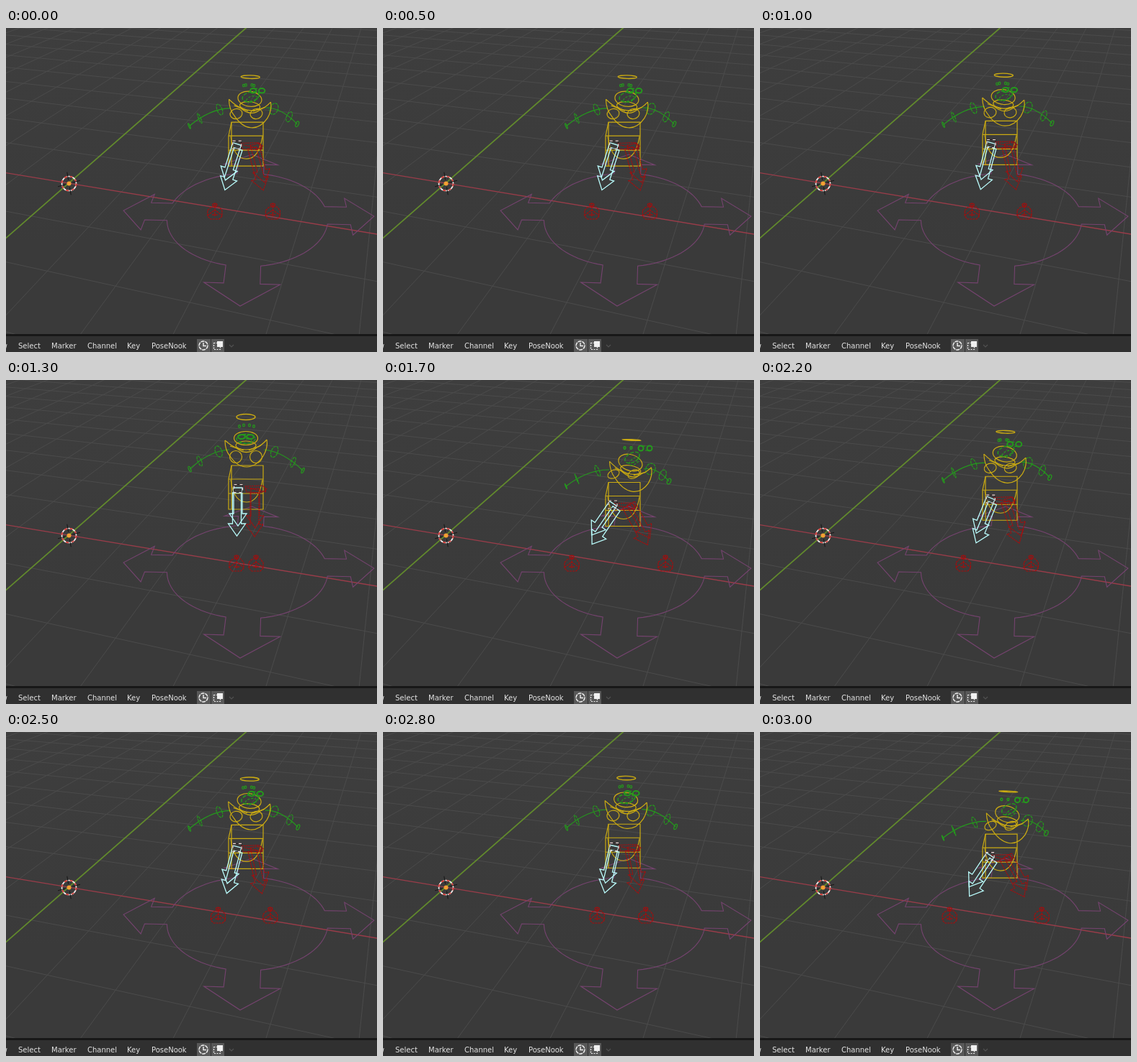
Recreate the animation shown at these times as an HTML page with a canvas. Size 515 px wide and 451 px high, loop 3800 ms.

```html
<!DOCTYPE html>
<html lang="en">
<head>
<meta charset="utf-8">
<title>Rig pose slider</title>
<style>
html, body { margin: 0; width: 100%; height: 100%; overflow: hidden; background: #3a3a3a; }
canvas { display: block; }
</style>
</head>
<body>
<canvas id="stage" width="515" height="451"></canvas>
<script>
const c = document.getElementById('stage').getContext('2d');
const YELLOW = '#cbab12', GREEN = '#249a1c', RED = '#a80c0c', CYAN = '#b9fbfb', PURPLE = '#75436f', WHITE = '#f0f0f0';
const DOTS = [2, 1];
const LOOP = 3800;

// Turning points of the slider: [ms, value], 0 = upright, 1 = crouched
const turns = [[0, .52], [900, .52], [1300, 0], [1700, 1], [2070, -.03], [2300, 1.1], [2650, .02], [3000, .98], [LOOP, .98]];
let u = 0;

const lerp = (a, b, k = u) => a + (b - a) * k;

function slider(t) {
  const i = turns.findIndex(p => p[0] > t);
  const [t0, a] = turns[i - 1], [t1, b] = turns[i];
  return lerp(a, b, (1 - Math.cos(Math.PI * (t - t0) / (t1 - t0))) / 2);
}

function stroke(color, width = 1.2, dash = []) {
  c.strokeStyle = color;
  c.lineWidth = width;
  c.setLineDash(dash);
  c.stroke();
  c.setLineDash([]);
}

function poly(color, points, closed, dash, width) {
  c.beginPath();
  for (const [x, y] of points) c.lineTo(x, y);
  if (closed) c.closePath();
  stroke(color, width, dash);
}

function oval(color, x, y, rx, ry, rot = 0, dash, width) {
  c.beginPath();
  c.ellipse(x, y, Math.abs(rx), Math.abs(ry), rot, 0, 7);
  stroke(color, width, dash);
}

function curve(color, x, y, ...bends) {
  c.beginPath();
  c.moveTo(x, y);
  for (const b of bends) c.quadraticCurveTo(...b);
  stroke(color);
}

function moved(dx, dy, paint, skewY = 0, skewX = 0) {
  c.save();
  c.transform(1, skewY, skewX, 1, dx, dy);
  paint();
  c.restore();
}

// Perspective view of the ground, in units of the base control's reach
function project(a, b) {
  const w = 1 - .0115 * a - .223 * b;
  return [(335 + 170 * a - 82.5 * b) / w, (258 + a + 42.7 * b) / w];
}

const cell = (i, j) => project(-1.598 + .505 * i + .117 * j, -.401 + .124 * i - .506 * j);

function floor() {
  const g = c.createLinearGradient(0, 0, 0, 300);
  g.addColorStop(0, '#3e3e3e');
  g.addColorStop(1, '#3a3a3a');
  c.fillStyle = g;
  c.fillRect(0, 0, 515, 451);
  for (let n = -20; n <= 16; n++) {
    if (n && n >= -4) poly('#4b4b4b', [cell(-20, n), cell(10, n)], false, [], 1);
    if (n && n <= 12) poly('#4b4b4b', [cell(n, -4), cell(n, 18)], false, [], 1);
  }
  poly('#993c49', [cell(-4, 0), cell(10, 0)], false, [], 1.3);
  poly('#628b2c', [cell(0, -4), cell(0, 18)], false, [], 1.8);
}

// Ring with an arrow on each side: one quarter, turned four times
const ring = [];
for (let q = 0; q < 4; q++) {
  const cos = Math.cos(q * Math.PI / 2), sin = Math.sin(q * Math.PI / 2);
  const add = (a, b) => ring.push(project(a * cos - b * sin, a * sin + b * cos));
  for (const p of [[.8, -.12], [.8, -.25], [1, 0], [.8, .25], [.8, .12]]) add(...p);
  for (let k = 0; k <= 20; k++) {
    const angle = lerp(.19, Math.PI / 2 - .19, k / 20);
    add(.635 * Math.cos(angle), .635 * Math.sin(angle));
  }
}

function cursor() {
  oval(WHITE, 87.5, 216.5, 10, 10, 0, [], 1.6);
  oval('#d8342f', 87.5, 216.5, 10, 10, 0, [4, 4], 1.6);
  for (let k = 0; k < 4; k++) {
    const angle = k * Math.PI / 2 + (k % 2 ? 1.4 - Math.PI / 2 : -.27);
    poly('#151515', [5, 16].map(r => [87.5 + r * Math.cos(angle), 216.5 + r * Math.sin(angle)]), false, [], 1);
  }
  c.fillStyle = '#f5a033';
  c.beginPath();
  c.arc(87.5, 216.5, 3, 0, 7);
  c.fill();
}

// Arched arm with two control rings and a cap at the hand
function arm(x0, y0, x1, y1, side) {
  const cx = (x0 + x1) / 2, cy = (y0 + y1) / 2 - 12;
  const at = (p, m, q, k) => lerp(lerp(p, m, k), lerp(m, q, k), k);
  curve(GREEN, x0, y0, [cx, cy, x1, y1]);
  const hoop = (k, rx, ry, dash) => oval(GREEN, at(x0, cx, x1, k), at(y0, cy, y1, k), rx, ry, side * .4, dash);
  hoop(.27, 4.5 + side * 2 * u, 8, [4, 1]);
  hoop(.75, 2.5 + side * 2 * u, 7.5, [4, 1]);
  hoop(1, 1.5 + side * u, 4);
}

function face() {
  oval(YELLOW, 333, 81, 16.5, lerp(9.5, 11.5));
  oval(YELLOW, 333, 91, 14, 6);
  curve(YELLOW, 304, 84, [304, 98, 311, 106], [321, 121, 334, 121], [347, 121, 357, 106], [364, 94, 362, 83]);
  curve(YELLOW, 304, 84, [313, 92, 319, 94], [334, 107, 348, 94], [355, 91, 362, 83]);
  poly(YELLOW, [[311, 92], [330, 98]]);
  poly(YELLOW, [[354, 91], [337, 98]]);
}

function head() {
  oval(YELLOW, lerp(333, 345), lerp(51.5, 83.5), 13, lerp(4, .7), .05 * u, [], 1.4);
  moved(8 * u - 0, 34 * u - .16 * 333 * u, face, .16 * u, .03 * u);
  for (const x of [319, 347]) oval(YELLOW, x + u, lerp(107, 131), 8.5, lerp(8.5, 5.5), -.45 * u);

  oval(GREEN, lerp(333, 346), lerp(82, 108), lerp(13, 11), 6.5, -.5 * u, [5, 2], 1.5);
  oval(GREEN, lerp(333, 349), lerp(84, 113), 8, 4, -.6 * u, [3, 2]);
  for (const side of [-1, 1]) {
    const x = lerp(333, 364) + 6 * side, y = lerp(79, 95);
    oval(GREEN, x, y, lerp(5, 3.5), lerp(3, 3.5), 0, [], 2);
    poly(GREEN, [[x - 6 * side, y + 3 * side], [x, y + 3 * side]]);
    for (const gap of [4, 10])
      oval(GREEN, lerp(334 + side * gap, 340 + side * 4.5), lerp(62 + gap / 4, 94.5), 1.4, 1.8);
  }
}

function body() {
  poly(YELLOW, [[313, 119], [357, 119], [357, 180], [309, 180], [309, 138]], true);
  poly(YELLOW, [[309, 138], [357, 138]]);
  poly(YELLOW, [[309, 158], [357, 158]]);
  poly(YELLOW, [[313, 119], [313, 180]]);
  curve(YELLOW, 312, 139, [316, 170, 334, 170], [351, 170, 356, 139]);
}

// Arrow hanging from a joint
function arrow(color, x, y, angle, length, dash) {
  const neck = length - 17;
  c.save();
  c.translate(x, y);
  c.rotate(angle);
  poly(color, [[-6, 0], [6, 0], [6, neck], [12, neck], [0, length], [-12, neck], [-6, neck]], true, dash, 1.3);
  c.restore();
}

function hips() {
  poly(RED, [[332, 148], [356, 147], [362, 152], [354, 157], [334, 156]], true, DOTS);
  poly(RED, [[358, 148], [361, 156], [334, 150]], false, DOTS);
}

function legs() {
  const left = .6 * u, right = -.5 * u;
  arrow(RED, lerp(345, 338), lerp(157, 176), right, 61, DOTS);
  arrow(RED, lerp(346, 344), lerp(151, 172), right, 55, DOTS);
  moved(-11 * u, 24 * u, hips);
  arrow(CYAN, lerp(322, 319.5), lerp(150, 172), left, 53);
  arrow(CYAN, lerp(320.5, 324), lerp(157, 179), left, 60);
  c.beginPath();
  c.rect(lerp(316.5, 313), lerp(145.5, 168), 12, 11);
  stroke('#302022', 1);
  stroke('#f0dada', 1.2, [4, 4]);
}

function foot() {
  poly(RED, [[-10, -3], [-5, -8], [6, -8], [10, -3], [10, 5], [6, 9], [-6, 9], [-10, 5]], true, [3, 1]);
  poly(RED, [[-10, 4], [0, -4], [10, 4]], false, [3, 1]);
  poly(RED, [[-4, 3], [4, 3]]);
  poly(RED, [[0, -13], [0, 5]], false, [3, 1]);
  oval(RED, 0, -11, 3, 2);
}

function bar() {
  c.fillStyle = '#181818';
  c.fillRect(0, 426, 515, 4);
  c.fillStyle = '#303030';
  c.fillRect(0, 429, 515, 22);
  c.font = '10px "DejaVu Sans", sans-serif';
  c.fillStyle = '#e4e4e4';
  c.textAlign = 'right';
  c.fillText('View', 2, 446);
  c.textAlign = 'left';
  for (const [label, x] of [['Select', 17], ['Marker', 63], ['Channel', 113], ['Key', 168], ['PoseNook', 202]])
    c.fillText(label, x, 446);

  c.fillStyle = '#585858';
  c.fillRect(265, 433, 19, 18);
  c.fillRect(285, 433, 18, 18);
  oval(WHITE, 274, 442, 6, 6, 0, [5, 1], 1.5);
  poly(WHITE, [[274, 438], [274, 442.5], [278, 442.5]], false, [], 1.4);
  c.beginPath();
  c.rect(288.5, 438.5, 9, 9);
  stroke(WHITE, 1.2, [2, 1.5]);
  c.fillStyle = WHITE;
  c.fillRect(293, 436, 8, 8);
  poly('#515151', [[310, 441], [313, 444], [316, 441]]);
}

function draw(now) {
  u = slider(Math.floor(now % LOOP / 100) * 100);
  floor();
  poly(PURPLE, ring, true, [], 1.1);
  cursor();
  arm(lerp(310, 314), lerp(97, 125), lerp(255, 254), lerp(124, 148), -1);
  arm(lerp(358, 362), lerp(97, 124), lerp(412, 397), lerp(126, 141), 1);
  moved(0, 23.5 * u, body);
  head();
  moved(lerp(320, 262), 257, foot);
  moved(lerp(347, 392), 257, foot);
  legs();
  bar();
}

const start = performance.now();
function tick() {
  draw(performance.now() - start);
  requestAnimationFrame(tick);
}
tick();
</script>
</body>
</html>
```
